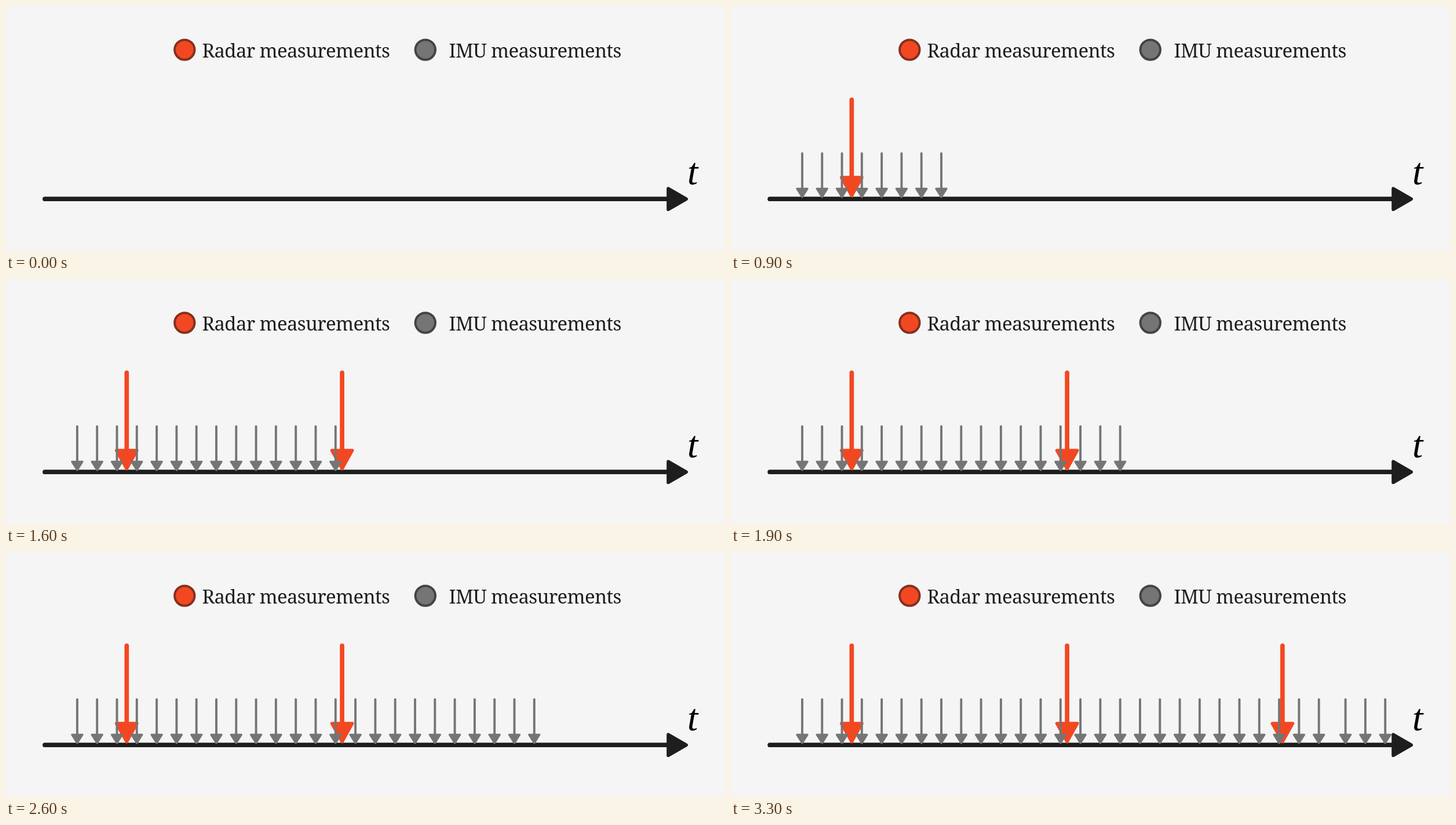
An HTML page with a canvas for the animation above (8 s loop, 1241 by 423 pixels).

```html
<!DOCTYPE html>
<html lang="en">
<head>
<meta charset="utf-8">
<title>Radar and IMU measurements over time</title>
<style>
  html, body { margin: 0; width: 100%; height: 100%; overflow: hidden; background: #f5f5f5; }
  canvas { display: block; width: 1241px; height: 423px; }
</style>
</head>
<body>
<canvas id="stage"></canvas>
<script>
const W = 1241, H = 423, LOOP = 8000, STEP = 100;
const INK = '#1e1e1e', RED = '#f24822', GREY = '#757575';
const AXIS_Y = 333.2;

const canvas = document.getElementById('stage');
const ratio = window.devicePixelRatio || 1;
canvas.width = W * ratio;
canvas.height = H * ratio;
const ctx = canvas.getContext('2d');
ctx.scale(ratio, ratio);
ctx.lineCap = ctx.lineJoin = 'round';

const RADAR = { color: RED, top: 161.8, width: 7.7, headTop: 296, half: 17.7, tip: 327.6, round: 5.4 };
const IMU = { color: GREY, top: 254.4, width: 3.9, headTop: 315.3, half: 9.1, tip: 330, round: 3.2 };

// Arrows appear one per step, from left to right.
const arrows = [];
for (let i = 0; i < 30; i++) {
  const gap = i < 27 ? 0 : 11.6;
  arrows.push({ x: 122.9 + 34.3 * i + gap, kind: IMU });
}
for (let i = 0; i < 3; i++) arrows.push({ x: 208.3 + 371.8 * i, kind: RADAR });
arrows.sort((a, b) => a.x - b.x);
arrows.forEach((arrow, i) => { arrow.start = STEP * (i + 1); });

function line(x1, y1, x2, y2, width, color) {
  ctx.strokeStyle = color;
  ctx.lineWidth = width;
  ctx.beginPath();
  ctx.moveTo(x1, y1);
  ctx.lineTo(x2, y2);
  ctx.stroke();
}

function triangle(points, round, color) {
  ctx.fillStyle = ctx.strokeStyle = color;
  ctx.lineWidth = round;
  ctx.beginPath();
  points.forEach(([x, y]) => ctx.lineTo(x, y));
  ctx.closePath();
  ctx.fill();
  ctx.stroke();
}

function drawArrow({ x, kind: k }) {
  line(x, k.top, x, k.headTop + 3, k.width, k.color);
  triangle([[x - k.half, k.headTop], [x + k.half, k.headTop], [x, k.tip]], k.round, k.color);
}

function dot(x, fill, edge) {
  ctx.fillStyle = fill;
  ctx.strokeStyle = edge;
  ctx.lineWidth = 4;
  ctx.beginPath();
  ctx.arc(x, 75.6, 17.2, 0, 2 * Math.PI);
  ctx.fill();
  ctx.stroke();
}

function label(text, x, y, font, color, spacing) {
  ctx.font = font;
  ctx.letterSpacing = spacing;
  ctx.fillStyle = color;
  ctx.fillText(text, x, y);
}

function drawScene() {
  const serif = '33px "Noto Serif", serif';
  ctx.fillStyle = '#f5f5f5';
  ctx.fillRect(0, 0, W, H);
  dot(308.3, RED, '#85301f');
  label('Radar measurements', 338.5, 89, serif, INK, '-0.7px');
  dot(723.8, GREY, '#444444');
  label('IMU measurements', 764.5, 89, serif, INK, '-0.7px');
  line(67, AXIS_Y, 1143, AXIS_Y, 7.8, INK);
  triangle([[1143, AXIS_Y - 18], [1143, AXIS_Y + 18], [1174.2, AXIS_Y]], 5.6, INK);
  label('t', 1176, 307.5, 'italic 66px "Liberation Serif", serif', '#000', '0px');
}

function frame() {
  const t = performance.now() % LOOP;
  const shown = arrows.filter(a => a.start <= t);
  drawScene();
  for (const kind of [RADAR, IMU]) shown.filter(a => a.kind === kind).forEach(drawArrow);
  requestAnimationFrame(frame);
}
frame();
</script>
</body>
</html>
```
